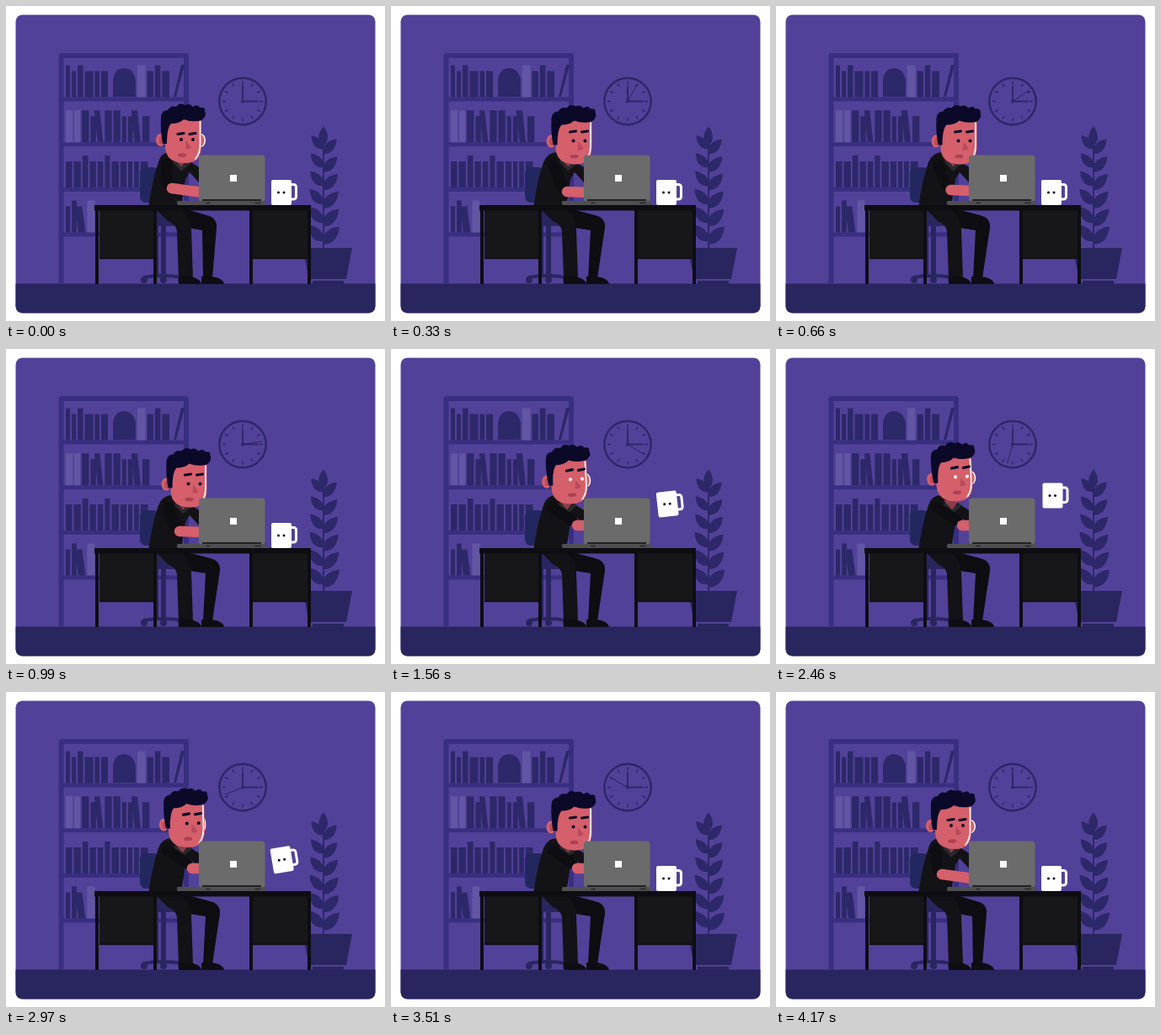
These frames come from a looping animation (450x375 px, 4.2 s). An HTML page with a canvas:

```html
<!DOCTYPE html>
<html lang="en">
<head>
<meta charset="utf-8">
<title>Night shift</title>
<style>
html, body { margin: 0; height: 100%; overflow: hidden; background: #fff; }
canvas { display: block; }
</style>
</head>
<body>
<canvas id="stage" width="450" height="375"></canvas>
<script>
const c = document.getElementById('stage').getContext('2d');
const LOOP = 4200;
const WALL = '#524199', NAVY = '#29265f', FRAME = '#382f80', BOOK = '#2d2869', PALE = '#6256a4';
const BLACK = '#0e0d12', CLOTH = '#131216', SKIN = '#d55f6b', SHADE = '#b94b5c', HAIR = '#0b0928';

// drawing helpers
const fill = (d, color) => { c.fillStyle = color; c.fill(new Path2D(d)); };
const line = (d, color, w, cap = 'round') => {
  c.strokeStyle = color; c.lineWidth = w; c.lineCap = cap; c.lineJoin = 'round';
  c.stroke(new Path2D(d));
};
const box = (x, y, x2, y2, color, r = 0) => {
  c.fillStyle = color; c.beginPath(); c.roundRect(x, y, x2 - x, y2 - y, r); c.fill();
};
const oval = (x, y, rx, ry, color) => {
  c.fillStyle = color; c.beginPath(); c.ellipse(x, y, rx, ry, 0, 0, 7); c.fill();
};
const moved = (x, y, deg, draw) => {
  c.save(); c.translate(x, y); c.rotate(deg * Math.PI / 180); draw(); c.restore();
};

// timing helpers: an eased step, and a step that is taken back later
const ramp = (t, from, to) => {
  const u = Math.min(1, Math.max(0, (t - from) / (to - from)));
  return u * u * (3 - 2 * u);
};
const hold = (t, from, to, back, end) => ramp(t, from, to) - ramp(t, back, end);

function seeded(seed) {
  return () => (seed = seed * 16807 % 2147483647) / 2147483647;
}

function books(left, right, base, rand) {
  for (let x = left; ;) {
    const w = 5 + 5 * rand(), h = rand() < .4 ? 38 : 31;
    const lean = rand() < .12 ? -4 : 0, pale = h > 31 && rand() < .3;
    if (x + w > right) break;
    fill(`M${x} ${base}l${lean} ${-h}h${w}l${-lean} ${h}z`, pale ? PALE : BOOK);
    x += w + 2;
  }
}

function shelf() {
  const rand = seeded(77);
  line('M65.5 330V59H214V330', FRAME, 6, 'butt');
  [126, 180, 173, 106].forEach((right, i) => {
    const base = 108.5 + 53.7 * i;
    box(65, base, 214, base + 5, FRAME);
    books(71, right, base, rand);
  });
  books(156, 200, 108.5, rand);
  fill('M199 108l9-38h4l-10 38z', BOOK);
  fill('M127 108V88Q129 74 140 74T154 88V108Z', BOOK);
}

function clock(t) {
  const u = t / LOOP;
  const angle = 360 * u - 17 * Math.sin(Math.PI * u) ** 4;
  moved(281, 113.5, 0, () => {
    c.strokeStyle = BOOK; c.lineWidth = 2.5;
    c.beginPath(); c.arc(0, 0, 27.7, 0, 7); c.stroke();
    for (let i = 0; i < 12; i++) moved(0, 0, i * 30, () => line('M0-24V-20', BOOK, 1.5, 'butt'));
    line('M0-18V0H18', BOOK, 2);
    moved(0, 0, angle, () => line('M0 0V-23', BOOK, 1));
    oval(0, 0, 2, 2, BOOK);
  });
}

function plant() {
  const leaf = (y, lean, size) => moved(377, y, lean, () => {
    c.scale(size, size);
    fill('M0 0C-8-5-8-15 0-24C7-15 7-5 0 0', BOOK);
  });
  line('M377 155V290', BOOK, 2);
  leaf(166, 0, .95);
  for (let i = 0; i < 6; i++) {
    leaf(170 + i * 22, -42, .9 + i * .04);
    leaf(176 + i * 21.5, 42, .98 + i * .04);
  }
  fill('M352 288H411L404 325H360Z', NAVY);
  box(364, 327, 401, 331, NAVY);
}

function chair() {
  box(159, 192, 182, 234, '#22285f', 7);
  box(176, 243, 206, 262, NAVY, 3);
  box(178, 262, 181, 321, NAVY);
  box(184, 262, 190, 321, NAVY);
  line('M164 323Q186 319 208 323', NAVY, 4);
  for (const x of [164, 187, 208]) oval(x, 326, 4, 4, NAVY);
}

function legs(k) {
  fill(`M195 240H208L${238 + k} 249Q${251 + k} 252 ${250 + k} 264L245 324H234L${233 + k} 267L205 262Z`, BLACK);
  fill(`M176 240H204Q${217 + k / 2} 248 220 266L222 324H205L203 268Q202 260 192 256Z`, CLOTH);
  for (const x of [205, 232]) fill(`M${x} 331V322H${x + 12}Q${x + 26} 324 ${x + 27} 331Z`, BLACK);
}

function desk() {
  box(111, 243, 176, 301, '#171618');
  box(293, 243, 358, 301, '#171618');
  for (const x of [106, 175, 289, 358]) box(x, 240, x + 4, 331, BLACK);
  line('M111 300.5H175M293 300.5H357', BLACK, 1.5, 'butt');
  box(105, 237, 362, 243.5, BLACK);
}

function head(turn, alarm, work) {
  oval(183.5, 159.5, 5.5, 7.5, SKIN);
  oval(184, 160, 2.5, 4.5, SHADE);
  const ear = 1 - turn;
  oval(231, 160, 6 * ear, 8, '#fff');
  oval(230, 160, 5.5 * ear, 7.5, SKIN);
  fill('M188 134H232V166Q232 187 213 187Q190 187 189 168Z', SKIN);
  line('M230.5 138V162Q231 175 225 182', '#fff0ea', 1.8);
  moved(2 * work + 2 * alarm, -alarm, 0, () => {
    const shocked = alarm > .5, r = shocked ? 2.1 : 2;
    fill('M214 160L220 168Q219 171 213 170Z', SHADE);
    oval(209, 177.5, 5, 2.3, '#aa4154');
    for (const x of [208, 222]) {
      oval(x, 159, r, r, shocked ? '#ffe9e6' : HAIR);
      line(`M${x - 4} ${152.5 - 4 * work}L${x + 3} ${151.5 - 4 * work}`, HAIR, 3.2);
    }
  });
  fill('M186 164Q183 148 184 132Q185 124 192 124Q195 118 202 120Q206 114 213 118' +
    'Q218 115 222 120Q228 116 230 121Q237 120 236 125Q239 131 232 136' +
    'Q222 139 211 135Q206 140 196 140Q191 145 191 164Z', HAIR);
}

function person(t, work, alarm) {
  const reach = hold(t, 1150, 1520, 3600, 4150);
  const tap = Math.sin(Math.PI * (t - 330) / 1320) ** 2 * Math.max(0, work - reach);
  const x = 6.5 * work - 4 * alarm;
  const y = 1.5 * work - 4 * alarm - 3 * hold(t, 1600, 2400, 2700, 3240);
  const armX = 197 + 12 * work + 12 * reach - 3 * tap;
  const armY = 217 + 4 * work - 11 * reach - 4 * tap;
  const s = x / 3;

  fill(`M${195 + s} 174Q${184 + s} 174 181 186Q174 206 169 240H208L213 206L218 198L229 210V192L214 182Z`, CLOTH);
  fill(`M${198 + s} 180H${217 + s}L${208 + s} 192Z`, '#8e3d4b');
  line(`M${200 + s} 185L${208 + s} 194L${217 + s} 186`, '#2c2a2d', 4);
  line(`M${190 + s} 188L${armX - 6} ${armY - 6}`, BLACK, 13);
  line(`M${armX} ${armY}L233 ${222 - 12 * reach - 4 * tap}`, SKIN, 12.5);
  moved(208 + x, 186 + y, -3 * alarm, () => {
    c.translate(-208, -186);
    head(work * (1 - .85 * alarm), alarm, work);
  });
}

function laptop() {
  box(229, 177.5, 307.5, 233, '#6b6b6c', 4);
  box(233, 230, 303, 232, '#222');
  box(203, 232, 309, 237, '#4f4f51', 1.5);
  line('M238 234.5H242M296 234.5H302', '#29292b', 1.5);
  box(266, 201, 274, 209, '#fff');
}

function mug(lift) {
  moved(327 + 1.5 * lift, 222 - 47.5 * lift, -38 * lift * (1 - lift), () => {
    c.strokeStyle = '#fff'; c.lineWidth = 3;
    c.beginPath(); c.roundRect(9, -9.5, 8.5, 17.5, 3); c.stroke();
    box(-12, -15, 12, 15, '#fff', 2);
    oval(-3.5, 0, 1.5, 1.5, HAIR);
    oval(3, 0, 1.5, 1.5, HAIR);
  });
}

function frame() {
  const t = performance.now() % LOOP;
  const work = hold(t, 0, 330, 3600, 4150);
  const alarm = hold(t, 1150, 1520, 2700, 3240);
  box(0, 0, 450, 375, '#fff');
  c.save();
  c.beginPath(); c.roundRect(11.5, 10.5, 427, 355, 8); c.clip();
  box(0, 0, 450, 375, WALL);
  shelf();
  clock(t);
  plant();
  box(0, 330.5, 450, 375, NAVY);
  chair();
  legs(4 * work);
  person(t, work, alarm);
  desk();
  laptop();
  mug(hold(t, 1110, 1750, 2700, 3220));
  c.restore();
  requestAnimationFrame(frame);
}
frame();
</script>
</body>
</html>
```
